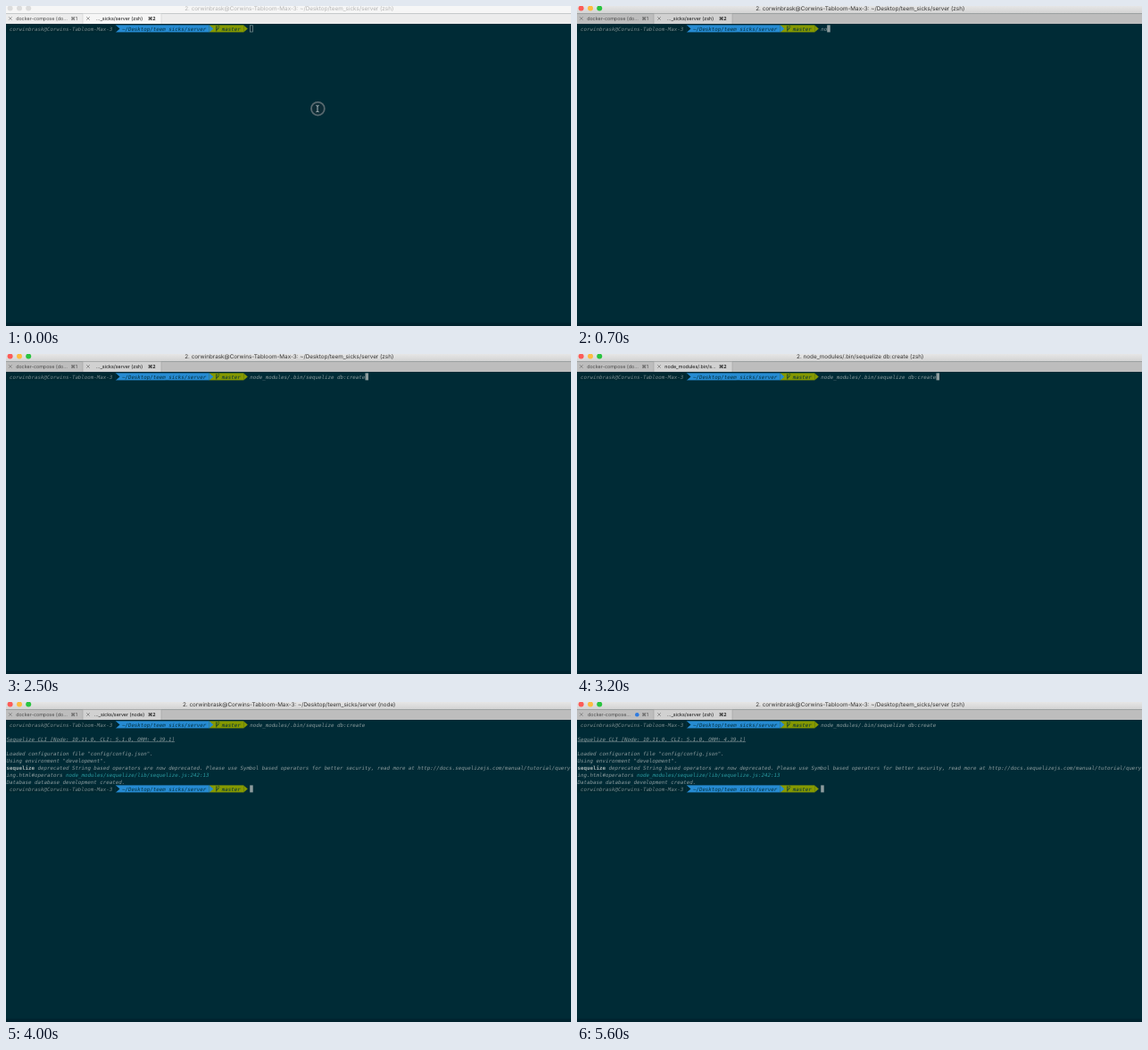
Animation, 633 px wide and 359 px high, one loop 5.7 s. Source, as an HTML page:

```html
<!DOCTYPE html>
<html lang="en">
<head>
<meta charset="utf-8">
<title>Terminal</title>
<style>
  html, body { margin: 0; width: 100%; height: 100%; overflow: hidden; background: #002b36; }
  svg { display: block; width: 633px; height: 359px; }
  text { white-space: pre; text-rendering: geometricPrecision; }
  .ui { font-family: Inter, Roboto, sans-serif; font-size: 5.36px; }
  .mono { font: italic 5.805px "DejaVu Sans Mono", monospace; fill: #8a9a9c; }
  .bold { font-weight: bold; font-style: normal; fill: #a3b1b1; }
  .link { fill: #2a9aa0; }
  .line { text-decoration: underline; }
  .mid { text-anchor: middle; }
</style>
</head>
<body>
<svg id="stage" viewBox="0 0 633 359">
  <defs>
    <linearGradient id="chrome" x2="0" y2="1">
      <stop offset="0" stop-color="#e6e6e6"/>
      <stop offset="1" stop-color="#d2d2d2"/>
    </linearGradient>
  </defs>
  <rect width="633" height="359" fill="#002b36"/>
  <rect y="355.5" width="633" height="3.5" fill="#00232e"/>
  <g id="term"></g>
  <rect id="cursor" width="3.5" height="8"/>

  <rect id="bar" width="633" height="8.5"/>
  <rect id="tabs" y="8.5" width="633" height="11.5"/>
  <rect id="active" x="86" y="8.5" width="88" height="11.5"/>
  <path id="edges" d="M0 8.5H633M86 8.5V20M174 8.5V20" fill="none" stroke-width=".6"/>
  <g id="lights"></g>
  <text id="title" class="ui mid" x="317.2" y="5.2" style="font-size:6.33px"></text>
  <path d="M3 12.2l3.6 3.6m0-3.6l-3.6 3.6M90.2 12.2l3.6 3.6m0-3.6l-3.6 3.6" stroke="#666" stroke-width=".6"/>
  <text id="tab1" class="ui mid" y="16" fill="#4a4a4a"></text>
  <text class="ui" x="72.5" y="16" fill="#4a4a4a">⌘1</text>
  <text id="tab2" class="ui mid" x="127" y="16" fill="#111"></text>
  <text class="ui" x="159" y="16" fill="#111" font-weight="600">⌘2</text>
  <g id="spinner"></g>
  <circle id="dot" cx="67.3" cy="14.2" r="2.3" fill="#2f7be0"/>

  <g id="pointer" fill="none">
    <circle id="ring" cx="349.4" cy="115.2" r="7.4" fill="#0d2c36" stroke="#58696f" stroke-width="1.8"/>
    <path d="M347.4 111.6q1.6 0 1.6 1v5.2q0 1-1.6 1M350.6 111.6q-1.6 0-1.6 1M350.6 118.8q-1.6 0-1.6-1" stroke="#d5dcdd" stroke-width=".8"/>
  </g>
</svg>
<script>
const LOOP = 5700, CELL = 3.495, LEFT = 0.6, TOP = 21.4, ROW = 8;
const HOST = 'corwinbrask@Corwins-Tabloom-Max-3';
const BIN = 'node_modules/.bin/sequelize ';
const HOME = `2. ${HOST}: ~/Desktop/teem_sicks/server `;

// Each track lists [start time, value].
const typed = [[0, ''], [500, 'n'], [600, 'no'], [1000, BIN + 'db:drop'],
  [1500, BIN + 'db:seed:all'], [1900, BIN + 'db:migrate'], [2100, BIN + 'db:create']];
const titles = [[0, HOME + '(zsh)'], [3200, `2. ${BIN}db:create (zsh)`],
  [3600, `2. ${BIN}db:create (node)`], [4000, HOME + '(node)'], [4300, HOME + '(zsh)']];
const tabNames = [[0, '…_sicks/server (zsh)'], [3200, 'node_modules/.bin/s…'],
  [4000, '…_sicks/server (node)'], [4300, '…_sicks/server (zsh)']];
const rows = [[0, 0], [3300, 1], [3700, 4], [3800, 6], [3900, 8], [4000, 9]];
const activity = [[0, 'none'], [4300, 'spin'], [5400, 'dot']];

// Output lines: row, then [column, text, class] runs.
const output = [
  [2, [0, 'Sequelize CLI [Node: 10.11.0, CLI: 5.1.0, ORM: 4.39.1]', 'line']],
  [4, [0, 'Loaded configuration file "config/config.json".']],
  [5, [0, 'Using environment "development".']],
  [6, [0, 'sequelize', 'bold'], [10, 'deprecated String based operators are now deprecated. Please use Symbol based operators for better security, read more at http://docs.sequelizejs.com/manual/tutorial/query']],
  [7, [0, 'ing.html#operators'], [19, 'node_modules/sequelize/lib/sequelize.js:242:13', 'link']],
  [8, [0, 'Database database_development created.']]
];

const $ = id => document.getElementById(id);
const at = (track, t) => track.reduce((v, [start, value]) => t >= start ? value : v, track[0][1]);
const colX = c => LEFT + c * CELL;
const rowY = r => TOP + r * ROW;
const set = (el, attrs) => { for (const k in attrs) el.setAttribute(k, attrs[k]); };
const show = (el, on) => { el.style.display = on ? '' : 'none'; };
const write = (el, s) => { if (el.textContent !== s) el.textContent = s; };

function add(parent, tag, attrs, text = '') {
  const el = document.createElementNS('http://www.w3.org/2000/svg', tag);
  set(el, attrs);
  el.textContent = text;
  parent.append(el);
  return el;
}

function run(parent, row, col, text, cls = '', style = '') {
  return add(parent, 'text', { class: 'mono ' + cls, x: colX(col), y: rowY(row) + 6.1, style }, text);
}

function prompt(row) {
  const g = add($('term'), 'g', {}), y = rowY(row);
  const block = (from, to, fill) =>
    add(g, 'rect', { x: colX(from), y, width: (to - from) * CELL, height: ROW, fill });
  const tip = (col, fill) =>
    add(g, 'path', { d: `M${colX(col)} ${y}l4.6 4l-4.6 4z`, fill });
  block(0, 35, '#002831');
  block(35, 65, '#268bd2');
  block(65, 76, '#859900');
  tip(35, '#002831');
  tip(65, '#268bd2');
  tip(76, '#859900');
  run(g, row, 1, HOST, '', 'fill:#77898c');
  run(g, row, 37, '~/Desktop/teem_sicks/server', '', 'fill:#03303d');
  add(g, 'path', { d: `M${colX(67) + 1} ${y + 1}v6m0-1.8q2.4-.3 2.4-2.6m-1-.6l1-1l1 1`,
    fill: 'none', stroke: '#03303d', 'stroke-width': .8 });
  run(g, row, 69, 'master', '', 'fill:#03303d');
  return g;
}

prompt(0);
const command = run($('term'), 0, 78, '');
const lines = output.map(([row, ...runs]) => {
  const g = add($('term'), 'g', {});
  runs.forEach(r => run(g, row, ...r));
  return [row, g];
});
const nextPrompt = prompt(9);
const lights = [4.6, 15, 25.2].map(cx => add($('lights'), 'circle', { cx, cy: 2.6, r: 3 }));
for (let i = 0; i < 10; i++) {
  add($('spinner'), 'path', { d: 'M0-3.2A3.2 3.2 0 0 1 1.9-2.6', fill: 'none', stroke: '#333',
    'stroke-width': 1.1, opacity: .1 + i * .09, transform: `rotate(${i * 36})` });
}

function setFocus(on) {
  const paint = on
    ? { bar: 'url(#chrome)', tabs: '#bdbdbd', active: '#d1d1d1', title: '#333' }
    : { bar: '#f6f6f6', tabs: '#ececec', active: '#f6f6f6', title: '#b4b4b4' };
  for (const id in paint) $(id).setAttribute('fill', paint[id]);
  $('edges').setAttribute('stroke', on ? '#a2a2a2' : '#d2d2d2');
  const colors = on ? ['#fc5b57', '#fdbc40', '#29c440'] : ['#dcdcdc', '#dcdcdc', '#dcdcdc'];
  lights.forEach((l, i) => l.setAttribute('fill', colors[i]));
}

function draw(t) {
  const focus = t >= 100, row = at(rows, t), text = at(typed, t), state = at(activity, t);
  setFocus(focus);
  write($('title'), at(titles, t));
  write($('tab2'), at(tabNames, t));
  write($('tab1'), state === 'none' ? 'docker-compose (do…' : 'docker-compose…');
  $('tab1').setAttribute('x', state === 'none' ? 40 : 36);
  write(command, text);
  lines.forEach(([r, g]) => show(g, r < row));
  show(nextPrompt, row === 9);

  const col = row === 0 ? 78 + text.length : row === 9 ? 78 : 0;
  set($('cursor'), focus
    ? { x: colX(col), y: rowY(row), width: 3.5, height: 8, fill: '#8d9c9e', stroke: 'none' }
    : { x: colX(col) + .4, y: rowY(row) + .4, width: 2.8, height: 7.2, fill: 'none', stroke: '#839496', 'stroke-width': .7 });

  show($('ring'), !focus);
  show($('pointer'), t < 500);
  show($('spinner'), state === 'spin');
  show($('dot'), state === 'dot');
  $('spinner').setAttribute('transform', `translate(66.4 14) rotate(${Math.floor(t / 100) * 36})`);
}

const begin = performance.now();
function tick() {
  draw((performance.now() - begin) % LOOP);
  requestAnimationFrame(tick);
}
tick();
</script>
</body>
</html>
```
